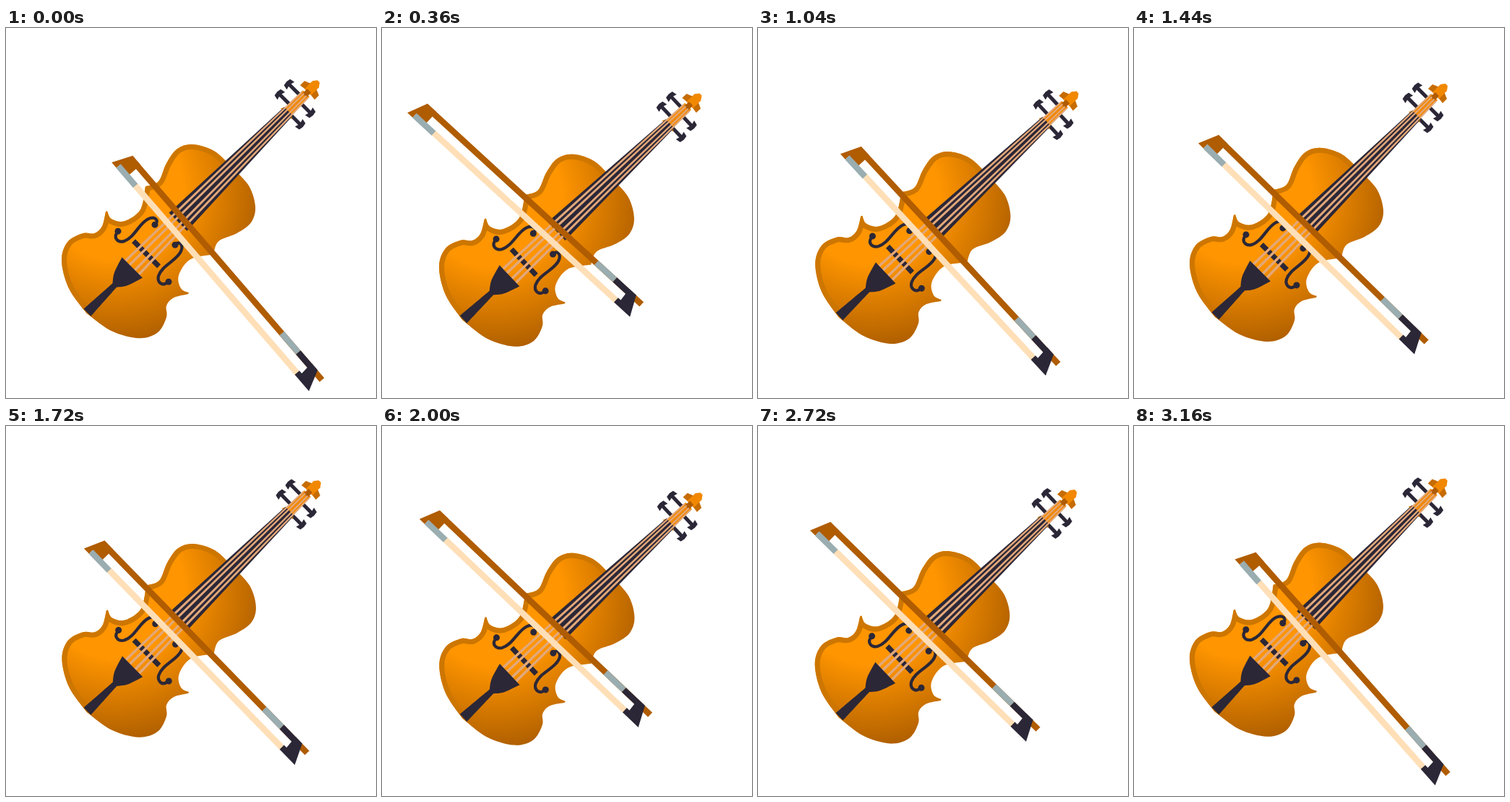
Animation of 512 by 512 pixels, one loop 3.2 s. Source, as an HTML page with a canvas:

```html
<!DOCTYPE html>
<html lang="en">
<head>
<meta charset="utf-8">
<title>Violin</title>
<style>
  html, body { margin: 0; width: 100%; height: 100%; overflow: hidden; background: #fff; }
  canvas { display: block; width: 512px; height: 512px; }
</style>
</head>
<body>
<canvas id="stage" width="512" height="512"></canvas>
<script>
const ctx = document.getElementById('stage').getContext('2d');
const LOOP = 3200, STEP = 40, TAU = Math.PI * 2;
const AXIS = 506; // the violin is symmetric about x + y = AXIS
const DARK = '#2b2737', RIM = '#cd7600', WOOD = '#b05c00', BRIGHT = '#f28800';
const STRING = '#e3a87a', HAIR = '#ffdfb7', METAL = '#9aadb0';
const TAIL = [112, 397], CONTACT = [234.5, 275];

// Ends of the bow strokes: [time, length of bow left of the strings]
const STROKES = [
  [10, 125], [390, 267], [810, 118], [1275, 214],
  [1630, 156], [2060, 250], [2425, 108], [2860, 251]
];

const mirror = ([x, y]) => [AXIS - y, AXIS - x];
const mirrorBack = pts => pts.map(mirror).reverse();
const onAxis = (m, v) => [m + v, AXIS - m + v];
const pairs = text => text.split(' ').map(p => p.split(',').map(Number));

// Smooth curve through the points
function spline(path, pts) {
  path.lineTo(...pts[0]);
  for (let i = 0; i < pts.length - 1; i++) {
    const p = pts[i], q = pts[i + 1];
    const before = pts[i - 1] || p, after = pts[i + 2] || q;
    path.bezierCurveTo(
      p[0] + (q[0] - before[0]) / 6, p[1] + (q[1] - before[1]) / 6,
      q[0] - (after[0] - p[0]) / 6, q[1] - (after[1] - p[1]) / 6, ...q);
  }
}

// Closed outline from the smooth runs of one half
function outline(...texts) {
  const runs = texts.map(pairs), path = new Path2D();
  [...runs, ...runs.map(mirrorBack).reverse()].forEach(r => spline(path, r));
  path.closePath();
  return path;
}

function poly(color, pts) {
  ctx.fillStyle = color;
  ctx.beginPath();
  pts.forEach(p => ctx.lineTo(...p));
  ctx.closePath();
  ctx.fill();
}

function symPoly(color, text) {
  const half = pairs(text);
  poly(color, [...half, ...mirrorBack(half)]);
}

// Band along the axis whose centre offset and half width change evenly
function band(color, m0, m1, v0, v1, w0, w1) {
  poly(color, [onAxis(m0, v0 - w0), onAxis(m1, v1 - w1), onAxis(m1, v1 + w1), onAxis(m0, v0 + w0)]);
}

function bothSides(paint) {
  paint();
  ctx.save();
  ctx.transform(0, -1, -1, 0, AXIS, AXIS);
  paint();
  ctx.restore();
}

const BODY = outline(
  '111.5,394.5 87,360 77,322 85,296 106,284 122,284 133,274 138,254',
  '140,253 146,264 164,267 186,251 193,219',
  '193,219 211,212 222,187 237,167 259,161 288,170 313,193');
const TAILPIECE = outline('160.5,317 150,338 147.5,353', '147.5,353 107.5,388.5');
const F_HOLE = new Path2D('M153 284C149 291 155 297 163 295C178 290 184 270 197 264C206 260 212 266 207 271');

const FACE = ctx.createRadialGradient(150, 225, 95, 150, 225, 215);
FACE.addColorStop(0, '#ff9500');
FACE.addColorStop(1, '#ab5c00');
const EDGE = ctx.createLinearGradient(240, 240, 268, 268);
EDGE.addColorStop(0, RIM);
EDGE.addColorStop(1, 'rgba(190,104,0,0)');

function fHole() {
  ctx.strokeStyle = ctx.fillStyle = DARK;
  ctx.lineWidth = 4.2;
  ctx.stroke(F_HOLE);
  for (const [x, y] of [[155, 281], [206, 272]]) {
    ctx.beginPath();
    ctx.arc(x, y, 4.5, 0, TAU);
    ctx.fill();
  }
}

// Tuning peg with its arrow-shaped grip at (x, y); side is 1 or -1
function peg(x, y, side) {
  ctx.save();
  ctx.translate(x, y);
  ctx.rotate(Math.PI / 4 + (side < 0 ? Math.PI : 0));
  poly(DARK, pairs('-24,-2.5 0,-2.5 0,2.5 -24,2.5'));
  poly(DARK, pairs('-4,-7.5 3,-6 4,0 3,6 -4,7.5 -2,0'));
  ctx.restore();
}

function drawHead() {
  peg(391, 77, -1);
  peg(378, 91, -1);
  peg(422, 118, 1);
  peg(408, 134, 1);
  symPoly(BRIGHT, '380,111 388,109 411,86');
  bothSides(() => poly('#c66c00', pairs('407,79 413,73 423,77 416,86')));
  symPoly(BRIGHT, '413,84 424,73 431,72');
  symPoly(WOOD, '410,90 417,84');
}

function drawViolin() {
  ctx.fillStyle = FACE;
  ctx.fill(BODY);
  ctx.save();
  ctx.clip(BODY);
  ctx.strokeStyle = EDGE;
  ctx.lineWidth = 14;
  ctx.stroke(BODY);
  ctx.restore();

  bothSides(fHole);
  drawHead();
  band(DARK, 238, 391, 0, 0, 12.5, 6);
  band(DARK, 191.5, 196.5, 0, 0, 17.5, 17.5);
  for (const k of [-3, -1.2, 1.2, 3])
    band(STRING, 173, 414, k * 3.1, k * 1.4, 1.25, 0.75);
  ctx.fillStyle = DARK;
  ctx.fill(TAILPIECE);
}

// Bow along the x axis, hair on y = 0 and stick above it
function drawBow() {
  const strip = (color, x0, x1, y) => {
    ctx.fillStyle = color;
    ctx.fillRect(x0, y, x1 - x0, 8.5);
  };
  strip(WOOD, 12, 418, -28);
  poly(WOOD, pairs('0,0 12,-28 29,-28 29,-7 10,-7 10,0'));
  strip(HAIR, 45, 389, -8.2);
  strip(METAL, 10, 46, -8);
  strip(METAL, 333, 368, -28);
  strip(DARK, 368, 404, -28);
  poly(DARK, pairs('391,-28 404,-28 418,0 388,0 388,-8.5 393,-8.5'));
}

// Eased length of bow left of the strings
function reachAt(t) {
  const n = STROKES.length;
  const next = STROKES.findIndex(s => s[0] > t);
  const [t1, r1] = STROKES[Math.max(next, 0)];
  const [t0, r0] = STROKES[next > 0 ? next - 1 : n - 1];
  const wrap = d => (d + LOOP) % LOOP;
  const f = wrap(t - t0) / wrap(t1 - t0);
  return r0 + (r1 - r0) * (1 - Math.cos(Math.PI * f)) / 2;
}

function draw(t) {
  const tilt = 0.024 * (0.951 + Math.cos(TAU * (t - 720) / 1600));
  const bob = 5.3 * (1 - Math.cos(TAU * (t - 30) / 800));

  // The bow turns steadily with its stroke, and more sharply near its low end
  const reach = reachAt(t);
  const slack = 265 - reach;
  const bend = Math.max(0, 180 - reach) ** 2;
  const angle = 41 + 0.043 * slack + 0.00074 * bend;
  const side = 11 + 0.06 * slack - 0.0036 * bend;

  ctx.setTransform(1, 0, 0, 1, 0, 0);
  ctx.fillStyle = '#fff';
  ctx.fillRect(0, 0, 512, 512);
  ctx.translate(TAIL[0], TAIL[1] + bob);
  ctx.rotate(tilt);
  ctx.translate(-TAIL[0], -TAIL[1]);
  drawViolin();

  ctx.translate(...CONTACT);
  ctx.rotate(angle * Math.PI / 180);
  ctx.translate(-reach, side);
  drawBow();
}

function tick() {
  draw(Math.floor(performance.now() % LOOP / STEP) * STEP);
  requestAnimationFrame(tick);
}
tick();
</script>
</body>
</html>
```
